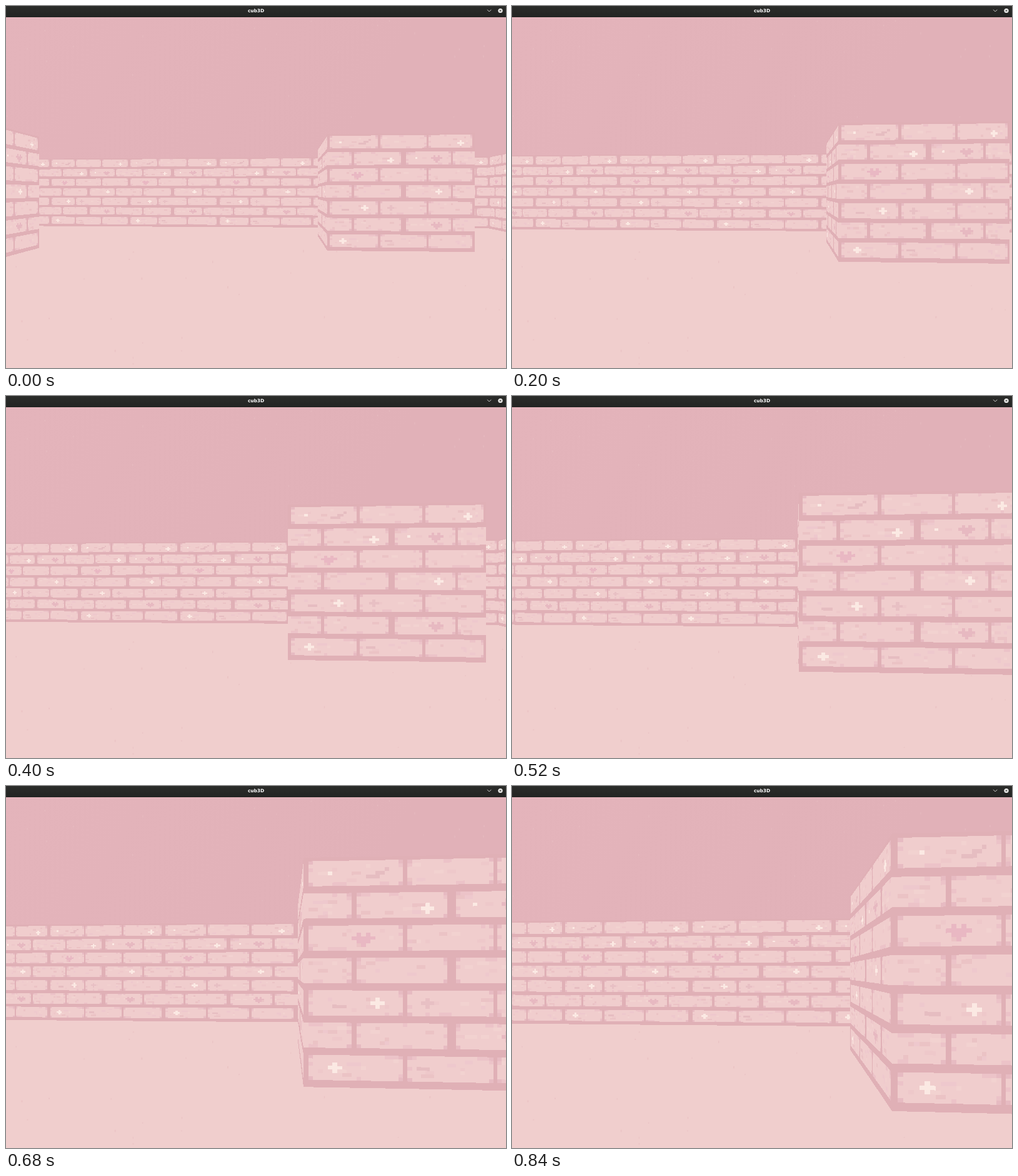
An HTML page with a canvas for the animation above (920 ms loop, 800x580 px).

```html
<!DOCTYPE html>
<html lang="en">
<head>
<meta charset="utf-8">
<title>cub3D</title>
<style>
  html, body { margin: 0; width: 100%; height: 100%; overflow: hidden; background: #f0cecd; }
  canvas { position: absolute; left: 0; top: 0; display: block; }
  .bar {
    position: absolute; left: 0; top: 0; width: 800px; height: 18px;
    background: linear-gradient(#2c2d2b, #222422);
    color: #fff; font: bold 7.4px/15px "DejaVu Sans", sans-serif; text-align: center;
  }
  .bar svg { position: absolute; left: 764px; top: 0; }
</style>
</head>
<body>
<canvas id="view" width="800" height="580"></canvas>
<div class="bar">cub3D
  <svg width="36" height="17" fill="none">
    <path d="M6 5.8 9.2 9 12.4 5.8" stroke="#c9c9c7"/>
    <circle cx="27" cy="7.5" r="3.6" fill="#f4f4f2"/>
    <path d="M25.6 6.1l2.8 2.8m0-2.8l-2.8 2.8" stroke="#2a2b29"/>
  </svg>
</div>
<script>
const W = 800, H = 580, BAR = 18, MID = 298.6;
const RAY = 764;        // pixels per radian, rays are spaced by equal angles
const SCALE = 563.5;    // wall height at distance 1
const YAW = 0.07, SIN = Math.sin(YAW), COS = Math.cos(YAW);
const TEX = 64;
const LOOP = 920, STEP = 40, LAST = 840;

// time, then the block's near corner seen from the camera: sideways, ahead
const PATH = [
  [0, .4533, 3.016], [160, .4533, 2.583], [200, .4097, 2.534],
  [400, .1514, 2.265], [520, .1523, 1.968], [600, .1532, 1.667],
  [720, .1532, 1.468], [760, .2028, 1.418], [840, .3537, 1.267]
];

// axis, fixed coordinate, from, to, texture direction; origin at that corner
const WALLS = [
  ['z', 0, 0, 1, 1],
  ['x', 0, 0, 1, -1],
  ['z', 2, -9, 2, 1],
  ['x', 2, 0, 2, -1],
  ['x', -2, -4, 0, 1]
];

function random(seed) {
  return () => {
    seed = (seed + 0x6D2B79F5) | 0;
    let n = Math.imul(seed ^ (seed >>> 15), seed | 1);
    n ^= n + Math.imul(n ^ (n >>> 7), n | 61);
    return ((n ^ (n >>> 14)) >>> 0) / 4294967296;
  };
}

function layer(w, h) {
  const c = document.createElement('canvas');
  c.width = w;
  c.height = h;
  return [c, c.getContext('2d')];
}

function makeBricks() {
  const [c, g] = layer(TEX, TEX), rnd = random(11);
  const dot = (color, x, y, w = 1, h = 1) => {
    g.fillStyle = color;
    g.fillRect(x, y, w, h);
  };
  const plus = (color, x, y) => {
    dot(color, x, y + 1, 3, 1);
    dot(color, x + 1, y, 1, 3);
  };
  const heart = (color, x, y) => {
    dot(color, x + 1, y);
    dot(color, x + 3, y);
    dot(color, x, y + 1, 5);
    dot(color, x + 1, y + 2, 3);
    dot(color, x + 2, y + 3);
  };
  const even = [[1, 21], [22, 42], [43, 63]];
  const odd = [[0, 10], [11, 31], [33, 53], [54, 64]];
  const flecks = ['#ebc3c5', '#eec8ca', '#f2d2d0', '#eec8cd'];

  dot('#e0b0b6', 0, 0, TEX, TEX);
  g.translate(0, 1);    // one line of mortar above the first row
  for (let row = 0; row < 7; row++) {
    const y = row * 9;
    for (const [a, b] of row % 2 ? odd : even) {
      dot('#f0cdcd', a, y, b - a, 7);
      for (let i = 0; i < 6; i++) {
        const w = 1 + Math.floor(rnd() * 2.2);
        const x = a + Math.floor(rnd() * (b - a - w));
        dot(flecks[Math.floor(rnd() * 4)], x, y + 1 + Math.floor(rnd() * 5), w);
      }
      // worn edges and corners
      for (let i = 0; i < 2; i++) {
        const w = 1 + Math.floor(rnd() * 3);
        dot('#ecc3c8', a + Math.floor(rnd() * (b - a - w)), y + (rnd() < .5 ? 0 : 6), w);
      }
      for (const x of [a, b - 1]) {
        if (x === 0 || x === TEX - 1) continue;
        dot('#e7bbc2', x, y);
        dot('#e7bbc2', x, y + 6);
        dot('#ecc3c8', x, y + 1 + Math.floor(rnd() * 5));
      }
    }
  }

  const light = '#fbe9e3', rose = '#e7b9c1', stain = '#e6bdc1';
  dot(stain, 17, 2);
  dot(stain, 15, 3, 2);
  dot(stain, 13, 4, 3);
  dot(stain, 6, 40, 3);
  dot(stain, 24, 57, 3);
  dot(light, 5, 3);
  dot(light, 37, 12);
  plus(light, 56, 3);
  plus(light, 25, 12);
  plus(light, 46, 29);
  plus(light, 14, 38);
  plus(light, 5, 56);
  plus('#e8c0c4', 25, 38);
  heart(rose, 44, 11);
  heart('#e9b8c3', 10, 20);
  heart(rose, 44, 47);
  return c;
}

function makeBackdrop() {
  const [c, g] = layer(W, H), rnd = random(5);
  const sky = g.createLinearGradient(0, BAR, 500, MID);
  sky.addColorStop(0, '#e4b4bb');
  sky.addColorStop(1, '#e1b1b8');
  g.fillStyle = sky;
  g.fillRect(0, 0, W, MID);
  g.fillStyle = '#f0cecd';
  g.fillRect(0, MID, W, H - MID);
  for (let i = 0; i < 60; i++) {
    const x = rnd() * W, floor = i % 2;
    g.fillStyle = floor ? 'rgba(222,176,182,.35)' : 'rgba(240,205,208,.25)';
    g.fillRect(x, floor ? 390 + rnd() * 185 : 22 + rnd() * 200, 1 + rnd(), 1 + rnd() * 3);
  }
  return c;
}

const ctx = document.getElementById('view').getContext('2d');
const bricks = makeBricks(), backdrop = makeBackdrop();

function cornerAt(t) {
  let i = 1;
  while (i < PATH.length - 1 && t > PATH[i][0]) i++;
  const a = PATH[i - 1], b = PATH[i], k = (t - a[0]) / (b[0] - a[0]);
  return [a[1] + (b[1] - a[1]) * k, a[2] + (b[2] - a[2]) * k];
}

function draw(t) {
  const [side, ahead] = cornerAt(t);
  const camX = -(side * COS - ahead * SIN);
  const camZ = -(side * SIN + ahead * COS);
  ctx.imageSmoothingEnabled = false;
  ctx.drawImage(backdrop, 0, 0);

  for (let col = 0; col < W; col++) {
    const slope = Math.tan((col + .5 - W / 2) / RAY);
    const dirX = slope * COS - SIN, dirZ = slope * SIN + COS;
    let near = Infinity, u = 0;
    for (const [axis, at, from, to, sign] of WALLS) {
      const depth = axis === 'z' ? (at - camZ) / dirZ : (at - camX) / dirX;
      if (!(depth > .05 && depth < near)) continue;
      const pos = axis === 'z' ? camX + depth * dirX : camZ + depth * dirZ;
      if (pos < from || pos > to) continue;
      near = depth;
      u = sign * pos;
    }
    if (near === Infinity) continue;
    const h = SCALE / near, texel = Math.floor((u - Math.floor(u)) * TEX);
    ctx.drawImage(bricks, texel, 0, 1, TEX, col, MID - h / 2, 1, h);
  }
}

const start = performance.now();
let shown = -1;
function tick() {
  const now = (performance.now() - start) % LOOP;
  const t = Math.min(LAST, Math.floor(now / STEP) * STEP);
  if (t !== shown) draw(shown = t);
  requestAnimationFrame(tick);
}
tick();
</script>
</body>
</html>
```
